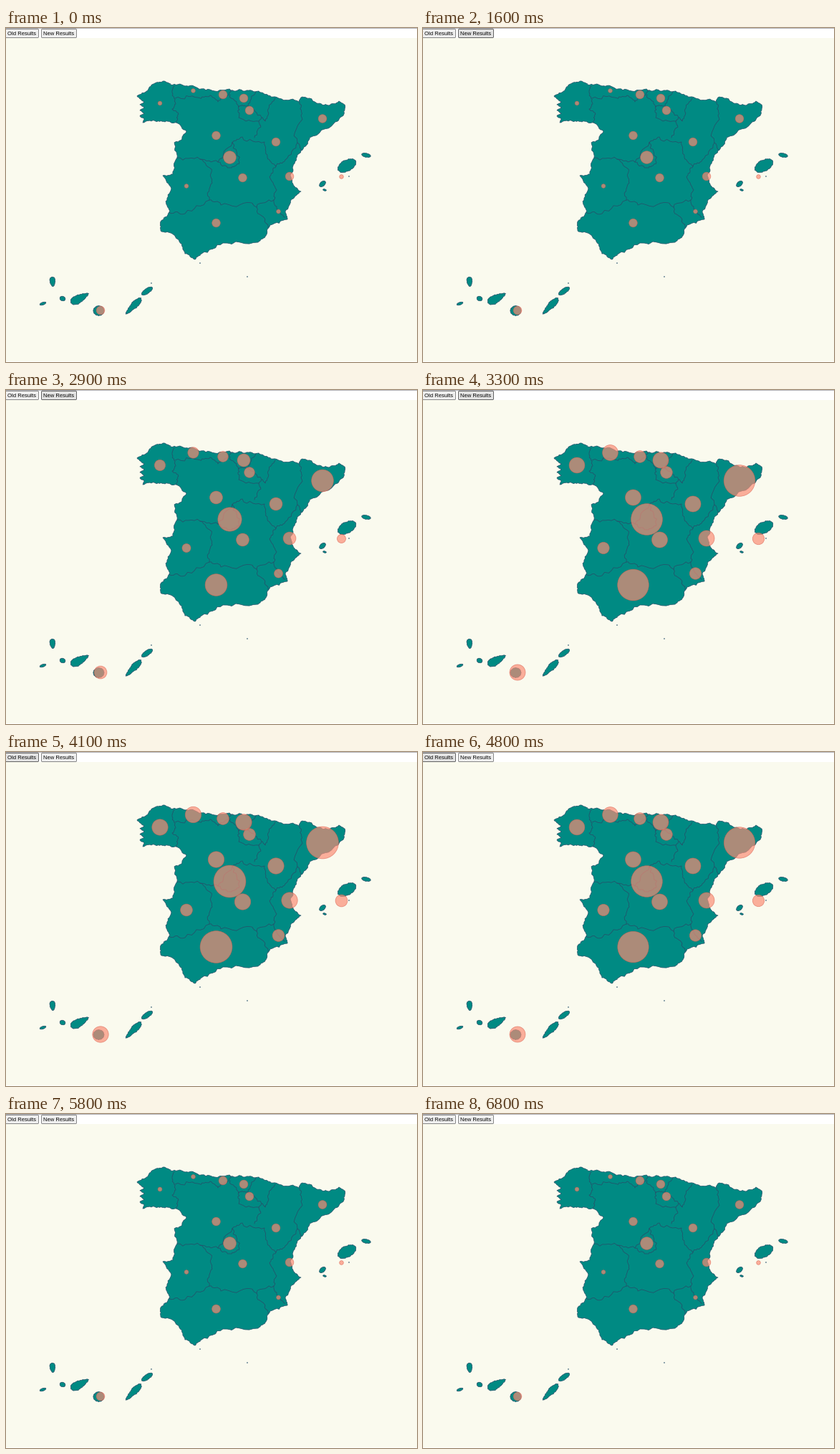
Write a matplotlib script that moves like this. It is 574 px wide and 466 px high and loops after 7000 ms.

```python
import random

import matplotlib.pyplot as plt
import numpy as np
from matplotlib.animation import FuncAnimation
from matplotlib.patches import Circle, FancyBboxPatch, Polygon, Rectangle

W, H, DPI = 574, 466, 100
STEP, FRAMES = 100, 70
PX = 72 / DPI  # one pixel in points

TEAL = "#008a83"
EDGE = "#27506a"
PAPER = "#fafaee"
DOT = (0.98, 0.55, 0.46, 0.69)
RING = (0.86, 0.38, 0.31, 0.6)

rng = random.Random(4)
fig = plt.figure(figsize=(W / DPI, H / DPI), dpi=DPI, facecolor="white")
ax = fig.add_axes([0, 0, 1, 1])
ax.set(xlim=(0, W), ylim=(H, 0))
ax.axis("off")

ax.add_patch(Rectangle((0, 14), W, H - 15, fc=PAPER, ec="none"))
ax.add_patch(Rectangle((0, 0), W, 1, fc="#b4b4ba", ec="none"))


def rough(pts, amount=0.07, depth=3):
    """Push the middle of every segment sideways, more so at fine scales."""
    for level in range(1, depth + 1):
        out = [pts[0]]
        for (x0, y0), (x1, y1) in zip(pts, pts[1:]):
            k = amount * level * rng.uniform(-1, 1)
            out += [((x0 + x1) / 2 - k * (y1 - y0),
                     (y0 + y1) / 2 + k * (x1 - x0)), (x1, y1)]
        pts = out
    return pts


def land(pts):
    shape = rough(pts + pts[:1])
    ax.add_patch(Polygon(shape, fc=TEAL, ec=EDGE, lw=0.7 * PX, joinstyle="round"))


def island(x, y, length, width, tilt=0, taper=0):
    """Ragged ellipse that narrows towards its far end."""
    a = np.linspace(0, 2 * np.pi, 12, endpoint=False)
    u, v = length * np.cos(a), width * np.sin(a) * (1 - taper * np.cos(a))
    c, s = np.cos(np.radians(tilt)), np.sin(np.radians(tilt))
    land(list(zip(x + c * u - s * v, y + s * u + c * v)))


def border(*pts):
    x, y = zip(*rough(list(pts), 0.11))
    ax.plot(x, y, color=EDGE, lw=0.75 * PX, solid_joinstyle="round")


# Mainland coast, clockwise from the north-west
north = [
    (183, 95), (198, 87), (208, 77), (221, 74), (230, 79), (250, 81),
    (262, 81), (285, 86), (312, 85), (334, 88), (353, 88), (366, 94),
    (385, 99), (409, 103), (412, 97), (427, 99), (434, 105), (450, 108),
    (465, 102), (473, 107),
]
east = [
    (472, 120), (458, 133), (424, 153), (421, 162), (412, 171), (403, 189),
    (397, 205), (403, 221), (412, 228), (399, 239), (390, 256), (393, 267),
]
south = [
    (369, 275), (362, 291), (352, 299), (303, 300), (273, 315), (264, 323),
    (250, 315), (242, 298), (230, 286), (217, 284),
]
west = [
    (216, 270), (228, 257), (223, 242), (231, 224), (219, 206), (233, 204),
    (239, 181), (235, 160), (243, 157), (252, 144), (238, 132), (222, 131),
    (207, 129), (191, 132),
]
inlets = [(187 + 6 * (i % 2 == 0), 127 - 4 * i) for i in range(7)]
land(north + east + south + west + inlets)

# Balearic islands
island(476, 192, 14, 8, -28)
island(503, 177.5, 6.5, 2.8, 12)
island(442, 217.5, 5.2, 3.2, -42)
island(445, 226, 2.4, 1.2, 15)

# Canary islands
island(65, 354, 6.8, 3.8, 85, 0.3)
island(51.5, 384.5, 4.6, 1.8, -20)
island(79, 377.5, 4, 3.2, 20)
island(103, 377, 14, 5.5, -28, 0.5)
island(129.5, 394.5, 7.6, 7)
island(178, 388, 15.5, 4.2, -46, -0.4)
island(197, 367, 9, 3.6, -34)

for spot in [(203, 356), (479, 207), (337, 347), (271, 328)]:
    ax.add_patch(Circle(spot, 0.8, fc=EDGE, ec="none"))

# Region borders
border((235, 81), (232, 90), (237, 106), (232, 113), (240, 118), (238, 132))
border((236, 98), (268, 97), (285, 94), (296, 103), (308, 95), (317, 87))
border((313, 93), (325, 110), (325, 125), (353, 130), (357, 125), (338, 109),
       (325, 110))
border((349, 89), (338, 109))
border((376, 98), (367, 112), (362, 130), (357, 125))
border((353, 130), (356, 138), (347, 153))
border((410, 103), (412, 122), (407, 160), (412, 171))
border((316, 160), (330, 152), (361, 159), (365, 180), (377, 193), (390, 184),
       (407, 160))
border((316, 160), (296, 187), (315, 195), (326, 188), (316, 160))
border((239, 181), (271, 183), (296, 187))
border((271, 183), (287, 201), (288, 216), (284, 240))
border((228, 257), (250, 259), (284, 240), (300, 247), (343, 244), (350, 250),
       (362, 268), (366, 279))
border((350, 250), (374, 240), (380, 255), (390, 264))
border((377, 193), (370, 205), (378, 226), (374, 240))

# Bubble centres by result: (old, new)
results = {
    (1, 4): [(215, 105), (261.5, 87.5)],
    (1, 3): [(252, 220.5), (380.5, 256), (468.5, 207.5)],
    (2, 3): [(303, 93), (340, 115)],
    (2, 4): [(293.5, 150), (377, 159), (330.5, 209), (396, 207), (132, 394),
             (332, 98)],
    (2, 8): [(442, 126.5), (293.5, 272)],
    (3, 8): [(312.5, 180.5)],
}
bubbles = [
    (3 * old - 0.2, 2.8 * new,
     ax.add_patch(Circle(spot, fc=DOT, ec=RING, lw=0.8 * PX, zorder=5)))
    for (old, new), spots in results.items() for spot in spots
]


def button(x, width, label):
    box = ax.add_patch(FancyBboxPatch(
        (x + 0.5, 1.5), width - 1, 12, boxstyle="round,pad=0,rounding_size=1.2",
        lw=0.85 * PX, zorder=6))
    ax.text(x + width / 2, 10.1, label, ha="center", va="baseline", zorder=7,
            family="Liberation Sans", size=7.6 * PX, color="black")
    return box


old_btn = button(-1, 47, "Old Results")
new_btn = button(49, 50, "New Results")


def ease(t, start, length=1500):
    """Cubic in-out progress of a transition."""
    u = np.clip((t - start) / length, 0, 1)
    return 4 * u**3 if u < 0.5 else 1 - 4 * (1 - u) ** 3


def hover(box, on):
    box.set_facecolor("#e3e3e3" if on else "#efefef")
    box.set_edgecolor("#4c4c4c" if on else "#767676")


def draw(i):
    t = i * STEP
    p = ease(t, 2110) - ease(t, 4470)
    for small, large, dot in bubbles:
        dot.set_radius(small + (large - small) * p)
    hover(new_btn, 800 <= t < 3700)
    hover(old_btn, 3800 <= t < 5000)
    return [dot for *_, dot in bubbles] + [old_btn, new_btn]


anim = FuncAnimation(fig, draw, frames=FRAMES, interval=STEP, repeat=True,
                     repeat_delay=0, blit=False)
plt.show()
```
